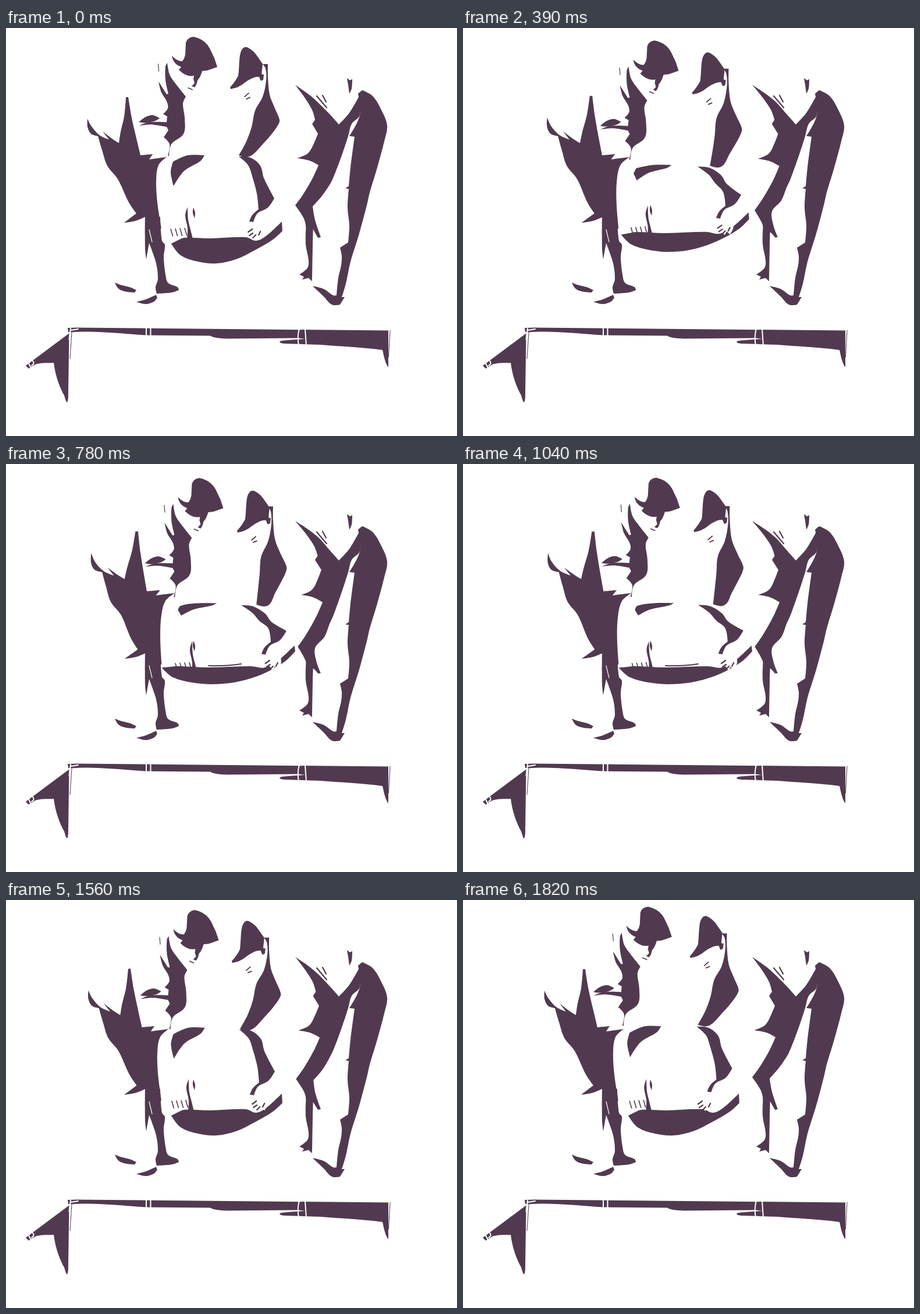
An HTML page for the animation above (1950 ms loop, 775 px wide and 702 px high).

```html
<!DOCTYPE html>
<html lang="en">
<head>
<meta charset="utf-8">
<title>Lifting a sack</title>
<style>
  html, body { margin: 0; width: 100%; height: 100%; overflow: hidden; background: #fff; }
  svg { display: block; width: 100%; height: 100%; }
</style>
</head>
<body>
<svg id="stage" viewBox="0 0 775 702"></svg>
<script>
const INK = '#513a4f', STEP = 130, DRAWINGS = 15;
const stage = document.getElementById('stage');
const moving = [];
const clamp = v => Math.max(0, Math.min(1, v));
const ease = v => v * v * (3 - 2 * v);

// One sinking parabola drives everybody: 0 = upright, 1 = bent to the ground.
function poseAt(i) {
  const sink = 1 - .0242 * (i - 6.4) ** 2;
  return { sink, down: clamp(sink), sway: Math.abs(sink), swing: ease(clamp((sink - .35) / .5)) };
}

function add(d, stroke, color = INK) {
  const el = document.createElementNS('http://www.w3.org/2000/svg', 'path');
  el.setAttribute('fill', stroke ? 'none' : color);
  if (stroke) {
    el.setAttribute('stroke', color);
    el.setAttribute('stroke-width', stroke);
    el.setAttribute('stroke-linecap', 'round');
  }
  el.setAttribute('d', d);
  stage.append(el);
  return el;
}

const points = s => s.trim().split(/\s+/).map(p => p.split(',').map(Number));

// Closed outline: gentle turns become curves, sharp turns stay corners.
function outline(pts) {
  const n = pts.length;
  const dir = pts.map(([bx, by], i) => {
    const [ax, ay] = pts[(i + n - 1) % n], [cx, cy] = pts[(i + 1) % n];
    const ux = bx - ax, uy = by - ay, wx = cx - bx, wy = cy - by;
    const bend = (ux * wx + uy * wy) / (Math.hypot(ux, uy) * Math.hypot(wx, wy) || 1);
    const len = Math.hypot(cx - ax, cy - ay) || 1;
    return bend < .65 ? [0, 0] : [(cx - ax) / len, (cy - ay) / len];
  });
  let d = 'M' + pts[0];
  pts.forEach(([ax, ay], i) => {
    const j = (i + 1) % n, [bx, by] = pts[j], s = dir[i], e = dir[j];
    const h = Math.hypot(bx - ax, by - ay) / 3;
    d += `C${[ax + s[0] * h, ay + s[1] * h, bx - e[0] * h, by - e[1] * h, bx, by].map(v => v.toFixed(1))}`;
  });
  return d + 'Z';
}

const shape = (s, color) => add(outline(points(s)), 0, color);

// Bends an outline: the rule gives the shift of each point for a pose.
function bend(s, rule) {
  const pts = points(s), el = add('');
  moving.push(pose => el.setAttribute('d', outline(pts.map(([x, y]) => {
    const [dx, dy] = rule(x, y, pose);
    return [x + dx, y + dy];
  }))));
}

function slide(rule, ...els) {
  moving.push(pose => els.forEach(el => el.setAttribute('transform', `translate(${rule(pose)})`)));
}

// Beam
add('M106 516L122 515.500L657 520.500V584C651 576 649 562 647 554C610 549 575 548 540 545L478 543Q468 542 471 539Q475 537 514 535L503 533.500L380 534.500Q357 534 351 529.500L240 528.500C200 526 150 520 113 523.500L107 523Z');
add('M109 525L34 581L39 586L50 579C62 575 74 577 82 576C85 600 93 620 100 632Q103 643 104.500 644Q107 644 107 630L108.500 527Z');
add('M113 524L110 569M660 520L657.500 566', 1);
add('M111 517L108.500 536M112 520L124 518M241 514V531M248.500 514V531M504 517Q500 532 503 546M514 518L516 547M39 577L43 585M46 573Q50 577 44 581', 2, '#fff');

// Left carrier
shape(`239,322 265,325 268,366 273,373 271,395 275,430 279,439 295,446 297,451 285,455 259,457
  257,446 261,432 258,405 246,370 241,398 239,380`);
bend(`140,156 146,168 160,184 177,192 166,178 183,191 194,198 197,178 203,152 206,119 210,119
  216,155 224,190 231,219 252,217 246,226 276,222 262,236 258,262 260,300 267,345 240,345 239,325
  222,332 203,335 224,319 211,300 192,260 174,237 165,210 158,186 146,182 140,170`,
  (x, y, { down }) => [down * .13 * (x - 80) * Math.max(0, 350 - y) / 230, -3 * down * (y < 160)]);
add('M246 347L251 368', 1.2, '#fff');
shape('187,438 197,442 213,446 224,451 221,455 208,454 194,449');
shape('224,471 240,467 258,459 260,464 254,471 240,475');

// Left lifter
slide(({ sink }) => [10.5 * sink, 9 * sink],
  shape(`277,60 281,80 290,94 309,118 304,130 307,155 305,182 284,200 280,221 278,219 281,200 271,188 279,176 276,170
    250,166 229,168 245,162 276,162 277,152 270,148 278,138 276,126 267,111 262,92 276,114 279,113 274,90 274,66`),
  shape('228,162 240,153 252,150 264,155 256,160 240,163'),
  add('M309 25Q312 16 322 15L329 17Q343 22 350 35L358 52L363 67Q355 70 346 73L337 74Q334 85 329 90Q328 97 324 102L319 100L324 95L322 88L323 82Q310 85 297 72L301 67Q287 62 285 48Q295 58 303 57Q307 52 308 45Z'),
  add('M261.500 62L262.500 74', 1.2),
  add('M313 103L320 106', 1.6));

// Right lifter
bend(`441,62 450,62 450,85 453,115 461,136 470,158 468,166 456,183 440,201 425,217 413,222 400,219
  413,195 422,170 428,142 441,118 447,90 446,70`,
  (x, y, { sink, sway, swing }) => {
    const u = (y - 60) / 160;
    return [9 * sway + 22 * u ** 4 * swing, 11 * sink + 12 * u * swing];
  });
bend('400,221 420,223 437,237 443,258 461,293 450,309 432,319 425,334 418,333 423,322 434,312 431,285 423,255 416,236',
  (x, y, { sink, sway, swing }) => {
    const u = clamp((y - 220) / 70);
    return [4 * sway + 17 * u * swing, 8 * sink + (14 - 28 * u * u) * swing];
  });
slide(({ sink, sway }) => [12 * sway, 13 * sink],
  add('M403 42Q407 31 414 33Q425 38 432 49L441 62L439 80L436 84Q428 83 420 88C410 92 405 102 386 105L385 102Q394 92 399 82C401 68 400 53 403 42Z'),
  shape('436,72 440,80 443,80 442,89 438,91 435,84'),
  add('M410 118L417 112M413 122L419 119.500', 1.8));

// Sack: belly, upper fold and seam
bend(`284,371 296,365 306,361 350,362 412,360 430,366 448,357 474,333 475,349 460,363 430,381 395,398 362,405 330,402 300,391`,
  (x, y, { swing }) => {
    const k = swing ** 1.5, dx = x - 365;
    return [.2 * dx * k, -(12 + .33 * (y - 362) + 1.3e-7 * dx ** 4) * k];
  });
bend('283,248 287,230 312,219 341,219 334,229 306,246 288,272',
  (x, y, { sink, swing }) => [2 * sink + (11 + .15 * (x - 287)) * swing, 4 * sink + (16 - .6 * (y - 220)) * swing]);
const seam = add('M348 347Q377 348 404 344', 2);
moving.push(({ swing }) => seam.setAttribute('visibility', swing > .95 ? 'visible' : 'hidden'));

// Hands
slide(({ sway, swing }) => [8 * sway, -3 * swing],
  add([0, 1, 2, 3].map(i => `M${283 + 8 * i} ${346 - i / 2}l3.500 12`).join(''), 1.6),
  shape('308,322 312,308 313,330 317,347 321,363 311,362 312,345'));
slide(({ swing }) => [0, -5 * swing], shape('322,309 325,318 324,327 321,318'));
slide(({ sink, swing }) => [30 * sink, -8 * swing],
  shape('421,340 441,336 443,350 437,362 432,357 428,363 422,354', '#fff'),
  add('M416 351L423 346M418 357L424 353M424 361L429 356M434 356L437 350', 2.2));

// Right carrier
shape('516,335 528,338 527,375 526,436 520,430 509,433 512,428 504,424 518,413 520,400 515,372');
shape(`590,186 608,150 605,113 612,107 630,117 645,141 655,168 650,195 638,240 625,283 620,305 606,357
  592,402 584,440 577,463 582,463 574,476 560,476 546,462 527,444 546,449 562,460 568,460 571,430 576,408
  577,393 574,378 588,369 590,340 587,310 589,277 583,276 589,272 592,240 599,187`);
bend(`497,98 520,114 536,128 556,148 572,166 590,146 607,117 608,150 594,165 588,186 576,222 563,256 556,270
  542,290 527,307 531,330 541,360 536,361 527,345 516,345 512,328 497,305 510,287 527,258 537,236 521,228
  500,224 517,217 525,207 536,182 526,165 531,158 526,141 512,118`,
  (x, y, { sink }) => {
    const k = clamp(1.3 * sink), u = (y - 98) / 262;
    return [7 * Math.sin(Math.PI * u) * k * (x < 550), 180 * u ** 6 * (1 - u) * k];
  });
add('M534 117L551 137M544 116L550 127', 2.2);
shape('586,86 591,90 595,88 594,104 590,113 588,98');

function draw(time) {
  const pose = poseAt(Math.floor(time / STEP) % DRAWINGS);
  for (const update of moving) update(pose);
}

let start;
function tick(now) {
  start ??= now;
  draw(now - start);
  requestAnimationFrame(tick);
}
draw(0);
requestAnimationFrame(tick);
</script>
</body>
</html>
```
